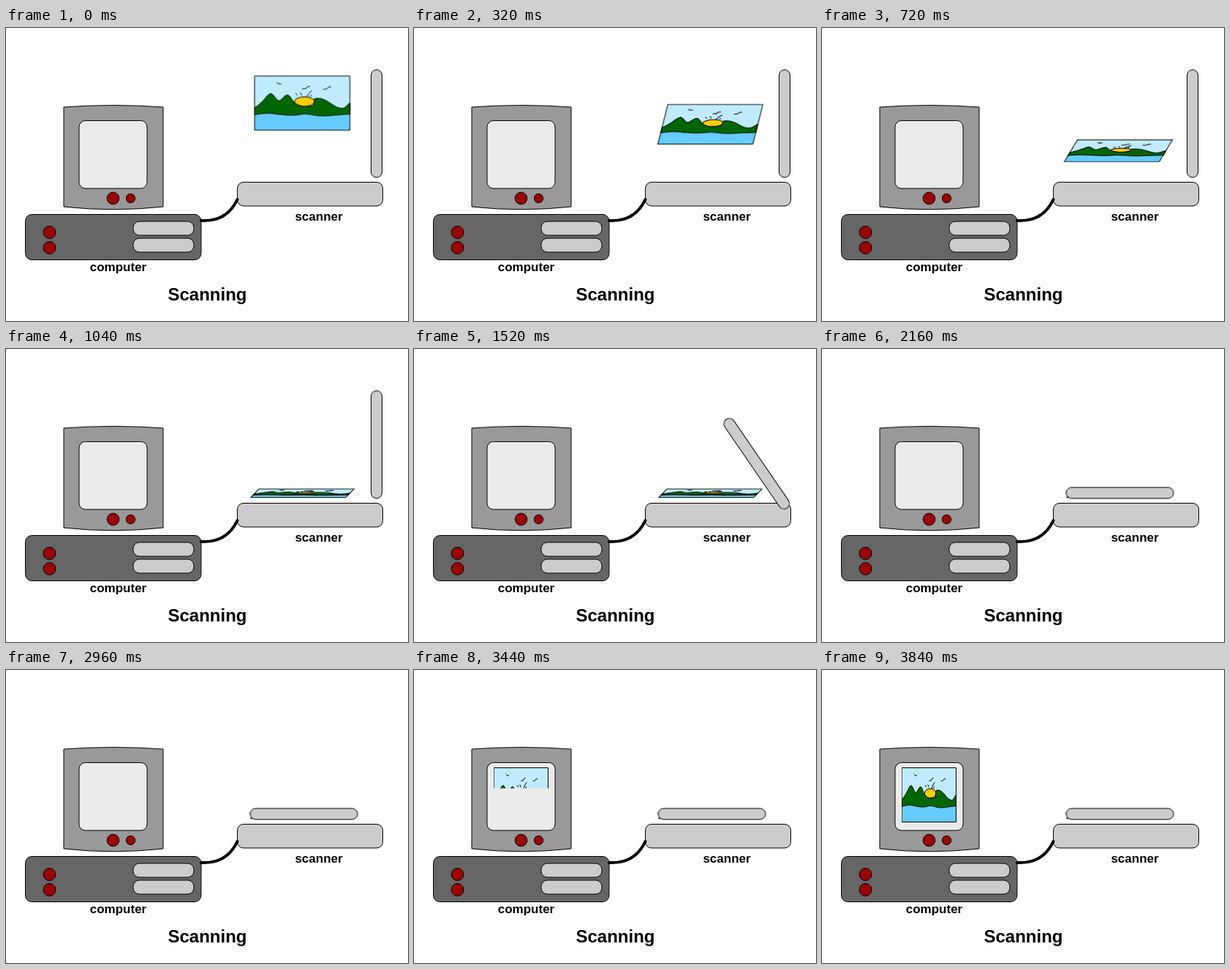
Write an HTML page that moves like this. It is 550x400 px and loops after 4160 ms.

```html
<!DOCTYPE html>
<html lang="en">
<head>
<meta charset="utf-8">
<title>Scanning</title>
<style>
  html, body { margin: 0; width: 100%; height: 100%; overflow: hidden; background: #fff; }
  svg { display: block; width: 550px; height: 400px; }
  text { font: bold 17px "Liberation Sans", Arial, sans-serif; text-anchor: middle; }
  .title { font-size: 24px; }
  .line { stroke: #000; stroke-width: 1; }
  .line * , .scene * { vector-effect: non-scaling-stroke; }
  .light { fill: #ccc; }
  .red { fill: #900; }

  #photo, #lid, #status, #wipe { animation: 4160ms infinite; }

  /* the photo tips over and sinks onto the glass */
  #photo { animation-name: lay; }
  @keyframes lay {
    0% { transform: translate(405.5px, 102.5px) skewX(0deg) scale(1, 1); animation-timing-function: steps(7); }
    13.461% { transform: translate(405.5px, 153px) skewX(-24.8deg) scale(1, .527); animation-timing-function: steps(6); }
    25%, 100% { transform: translate(405.5px, 196.8px) skewX(-43.7deg) scale(1, .155); }
  }

  #lid { animation-name: shut; }
  @keyframes shut {
    0%, 26.923% { transform: translate(507px, 130.5px) rotate(0deg); animation-timing-function: steps(7); }
    40.384% { transform: translate(453.5px, 167px) rotate(-48.3deg); animation-timing-function: steps(6); }
    51.923%, 100% { transform: translate(407.5px, 196.5px) rotate(-90deg); }
  }

  #status { font-size: 24px; text-anchor: start; animation-name: busy; animation-timing-function: step-end; }
  @keyframes busy {
    0%, 71.153% { opacity: 0; }
    53.846% { opacity: 1; }
    100% { opacity: 0; }
  }

  #status tspan { animation: 320ms step-end infinite; }
  #status .d1 { animation-name: dot1; }
  #status .d2 { animation-name: dot2; }
  #status .d3 { animation-name: dot3; }
  @keyframes dot1 { 0% { fill-opacity: 0; } 25%, 100% { fill-opacity: 1; } }
  @keyframes dot2 { 0% { fill-opacity: 0; } 50%, 100% { fill-opacity: 1; } }
  @keyframes dot3 { 0% { fill-opacity: 0; } 75%, 100% { fill-opacity: 1; } }

  /* the scan appears on the screen from the top down */
  #wipe { transform-box: fill-box; transform-origin: top; animation-name: reveal; }
  @keyframes reveal {
    0%, 76.923% { transform: scaleY(0); animation-timing-function: steps(8); }
    92.307%, 100% { transform: scaleY(1); }
  }
</style>
</head>
<body>
<svg viewBox="0 0 550 400">
  <defs>
    <g id="scene" class="scene" stroke="#000" stroke-width="1" stroke-linecap="round">
      <rect width="130" height="74" fill="#c0ebff" stroke="none"/>
      <rect y="48" width="130" height="26" fill="#6cf" stroke="none"/>
      <ellipse cx="68" cy="35" rx="14" ry="6.5" fill="#fc0"/>
      <path fill="#060" d="M0 43C4 41 8 37 12 33C16 28 19 24 22 24C26 25 29 33 33 34C37 33 41 25 45 26
        C49 27 50 33 53 35C57 39 63 42 68 41.5L80 41C81 37 81 33 82 31C90 29 97 33 103 37
        C110 42 116 45 121 44C126 42 127 38 130 37V52C115 53 105 54 95 54.5C82 55 75 51 65 52
        C50 55 40 53 30 52C18 50 8 51 0 53Z"/>
      <path fill="none" d="M30 9q2 2 3 2q1-2 3 0M65 18q3-2 4 0q2-4 6-4M94 18q3 1 5-1q2-3 5-2
        M71 28q3-5 7-8M76 28l1-2M56 24l2 2M62 23q2 1 2 3"/>
      <rect width="130" height="74" fill="none"/>
    </g>
    <clipPath id="scan"><rect id="wipe" x="109" y="133" width="76" height="76"/></clipPath>
  </defs>

  <g class="line">
    <path fill="#999" d="M79 108Q147 103 215 108V244Q147 251.5 79 244Z"/>
    <rect x="100" y="126.5" width="93" height="92.5" rx="8.5" fill="#ebebeb"/>
    <circle class="red" cx="146.5" cy="232.5" r="8.3"/>
    <circle class="red" cx="170.5" cy="232.5" r="6.2"/>
    <rect x="26.5" y="254.5" width="240.5" height="62" rx="9" fill="#666"/>
    <circle class="red" cx="59.5" cy="279" r="8.5"/>
    <circle class="red" cx="59.5" cy="300" r="8.5"/>
    <rect class="light" x="174" y="264" width="83" height="19" rx="8.5"/>
    <rect class="light" x="174" y="287" width="83" height="19" rx="8.5"/>
  </g>
  <g clip-path="url(#scan)">
    <use href="#scene" transform="translate(109.5 133.5) scale(.5692 1)"/>
  </g>

  <rect class="line light" x="316.5" y="210.5" width="199" height="32.5" rx="8.5"/>
  <path d="M267 263Q302 265 316.5 234" fill="none" stroke="#000" stroke-width="4" stroke-linecap="round"/>
  <g id="photo"><use href="#scene" x="-65" y="-37"/></g>
  <rect id="lid" class="line light" x="-7.5" y="-73.5" width="15" height="147" rx="7.5"/>

  <text x="153.5" y="332">computer</text>
  <text x="428" y="263">scanner</text>
  <text class="title" x="275.5" y="372">Scanning</text>
  <text id="status" x="353.3" y="164">scanning<tspan class="d1">.</tspan><tspan class="d2">.</tspan><tspan class="d3">.</tspan></text>
</svg>
</body>
</html>
```
